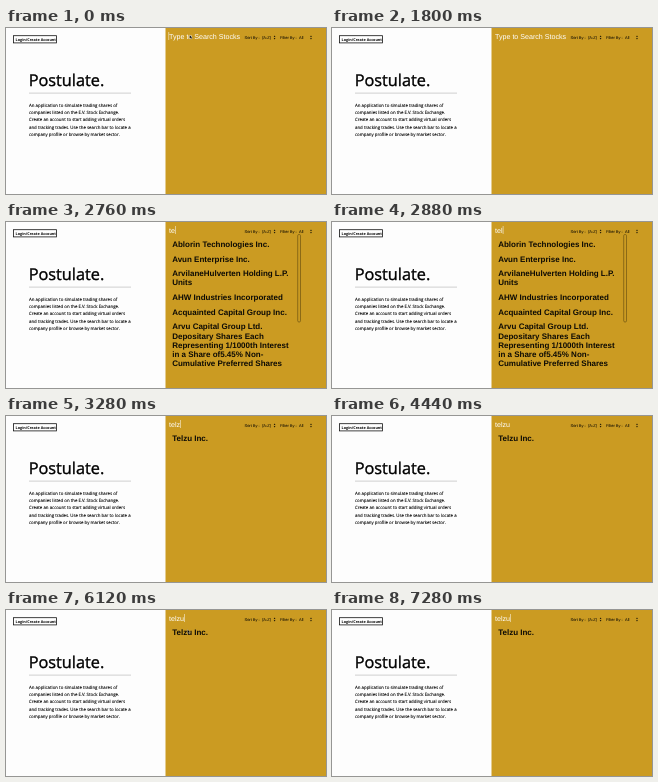
Recreate the animation shown at these times as an HTML page. Size 320x166 px, loop 8000 ms.

```html
<!DOCTYPE html>
<html lang="en">
<head>
<meta charset="utf-8">
<title>Stock search</title>
<style>
  html, body { margin: 0; width: 100%; height: 100%; overflow: hidden; background: #fff; }
  svg { display: block; width: 100vw; height: 100vh; text-rendering: geometricPrecision; }
  .left { font-family: "Open Sans", "Noto Sans", sans-serif; fill: #000; }
  .right { font-family: "Liberation Sans", Arial, sans-serif; }
  .title { font-size: 16.3px; stroke: #000; stroke-width: .35; }
  .about { font-size: 4.36px; stroke: #000; stroke-width: .1; }
  .login { font-size: 3.75px; font-weight: 700; }
  .query { font-size: 7.11px; fill: #fff; }
  .menu { font-size: 3.95px; fill: #1c1608; stroke: #1c1608; stroke-width: .06; }
  .names { font-size: 8px; font-weight: 700; fill: #0d0b05; }
</style>
</head>
<body>
<svg viewBox="0 0 320 166">
  <rect width="160" height="166" fill="#fdfdfd"/>
  <rect x="159.5" width="160.5" height="166" fill="#cb9b22"/>

  <g class="left">
    <rect x="7.5" y="7.7" width="43" height="7.2" fill="#fff" stroke="#111" stroke-width=".8"/>
    <text class="login" x="9.6" y="12.6">Login/Create Account</text>
    <text class="title" x="22.7" y="58">Postulate.</text>
    <rect x="23" y="64.6" width="102" height="1" fill="#d0d0d0"/>
    <g id="about" class="about"></g>
  </g>

  <g class="right">
    <text id="query" class="query" x="163" y="11"></text>
    <rect id="caret" y="4" width=".5" height="8" fill="#fff"/>
    <g class="menu">
      <text x="238.5" y="10.8">Sort By :</text>
      <text x="256" y="10.8">(A-Z)</text>
      <text x="274" y="10.8">Filter By :</text>
      <text x="293" y="10.8">All</text>
      <path id="arrows" d="M267.8 9.1l.8-1.5 .8 1.5zM267.8 9.9l.8 1.5 .8-1.5z"/>
      <use href="#arrows" x="36.4"/>
    </g>
    <g id="names" class="names"></g>
    <rect id="thumb" x="291.7" y="12.5" width="2.8" height="87.5" rx="1.2" fill="none" stroke="#604a10" stroke-width=".6"/>
  </g>

  <path id="pointer" d="M0 0v3.8l.9-.8.6 1.3.7-.3-.6-1.3h1.2z" fill="#000" stroke="#fff" stroke-width=".25"/>
</svg>
<script>
const LOOP = 8000;
const $ = id => document.getElementById(id);

const about = [
  "An application to simulate trading shares of",
  "companies listed on the E.V. Stock Exchange.",
  "Create an account to start adding virtual orders",
  "and tracking trades. Use the search bar to locate a",
  "company profile or browse by market sector."
];

// "|" marks a wrapped line
const lists = {
  none: [],
  t: ["Ablorin Technologies Inc.", "Amlis Corporation", "Brath Merl Physical Gold",
    "Atlusa Inc.", "AlnoverShares Horvey Knight|ADR",
    "Ardisvorel Asset Management|Corp Com", "Arlentic Amberian Corporation"],
  te: ["Ablorin Technologies Inc.", "Avun Enterprise Inc.",
    "ArvilaneHulverten Holding L.P.|Units", "AHW Industries Incorporated",
    "Acquainted Capital Group Inc.",
    "Arvu Capital Group Ltd.|Depositary Shares Each|Representing 1/1000th Interest|in a Share of5.45% Non-|Cumulative Preferred Shares"],
  found: ["Telzu Inc."]
};

const queries = [[0, ""], [1840, "t"], [2320, "te"], [2800, "tel"], [3160, "telz"], [3360, "telzu"]];
const results = [[0, "none"], [1880, "t"], [2400, "te"], [2920, "found"]];
const carets = [[0, 1], [600, 0], [1840, 1], [4440, 0], [5480, 1]];
// time, x, y of the pointer
const trips = [
  [[0, 183.7, 7], [600, 183.7, 7], [760, 191, 6]],
  [[5480, 183.7, 7], [5800, 184, 13], [6240, 181, 21], [6480, 181, 21], [6880, 178, 22]]
];

const at = (steps, t) => steps.filter(s => s[0] <= t).pop()[1];
const line = (x, y, s) => `<text x="${x}" y="${y}">${s}</text>`;

function listMarkup(items) {
  let y = 25;
  return items.map(item => {
    const rows = item.split("|").map((s, i) => line(166.2, y + i * 9.25, s));
    y += 14.6 + (rows.length - 1) * 9.25;
    return rows.join("");
  }).join("");
}

function pointerAt(t) {
  const trip = trips.find(p => t >= p[0][0] && t < p[p.length - 1][0]);
  if (!trip) return null;
  const i = trip.findIndex(p => p[0] > t);
  const [t0, x0, y0] = trip[i - 1], [t1, x1, y1] = trip[i];
  const k = (t - t0) / (t1 - t0), e = k * k * (3 - 2 * k);
  return [x0 + (x1 - x0) * e, y0 + (y1 - y0) * e];
}

let shown;
function draw(t) {
  const text = at(queries, t), list = at(results, t), spot = pointerAt(t);
  $("query").textContent = text || "Type to Search Stocks";
  $("caret").setAttribute("x", text ? 163.3 + $("query").getComputedTextLength() : 162.6);
  $("caret").setAttribute("opacity", at(carets, t));
  if (list !== shown) {
    $("names").innerHTML = listMarkup(lists[list]);
    shown = list;
  }
  $("thumb").setAttribute("visibility", list === "te" ? "visible" : "hidden");
  $("pointer").setAttribute("visibility", spot ? "visible" : "hidden");
  if (spot) $("pointer").setAttribute("transform", `translate(${spot})`);
}

$("about").innerHTML = about.map((s, i) => line(23, 78.9 + i * 7.25, s)).join("");

const start = performance.now();
function tick() {
  draw((performance.now() - start) % LOOP);
  requestAnimationFrame(tick);
}
draw(0);
requestAnimationFrame(tick);
</script>
</body>
</html>
```
